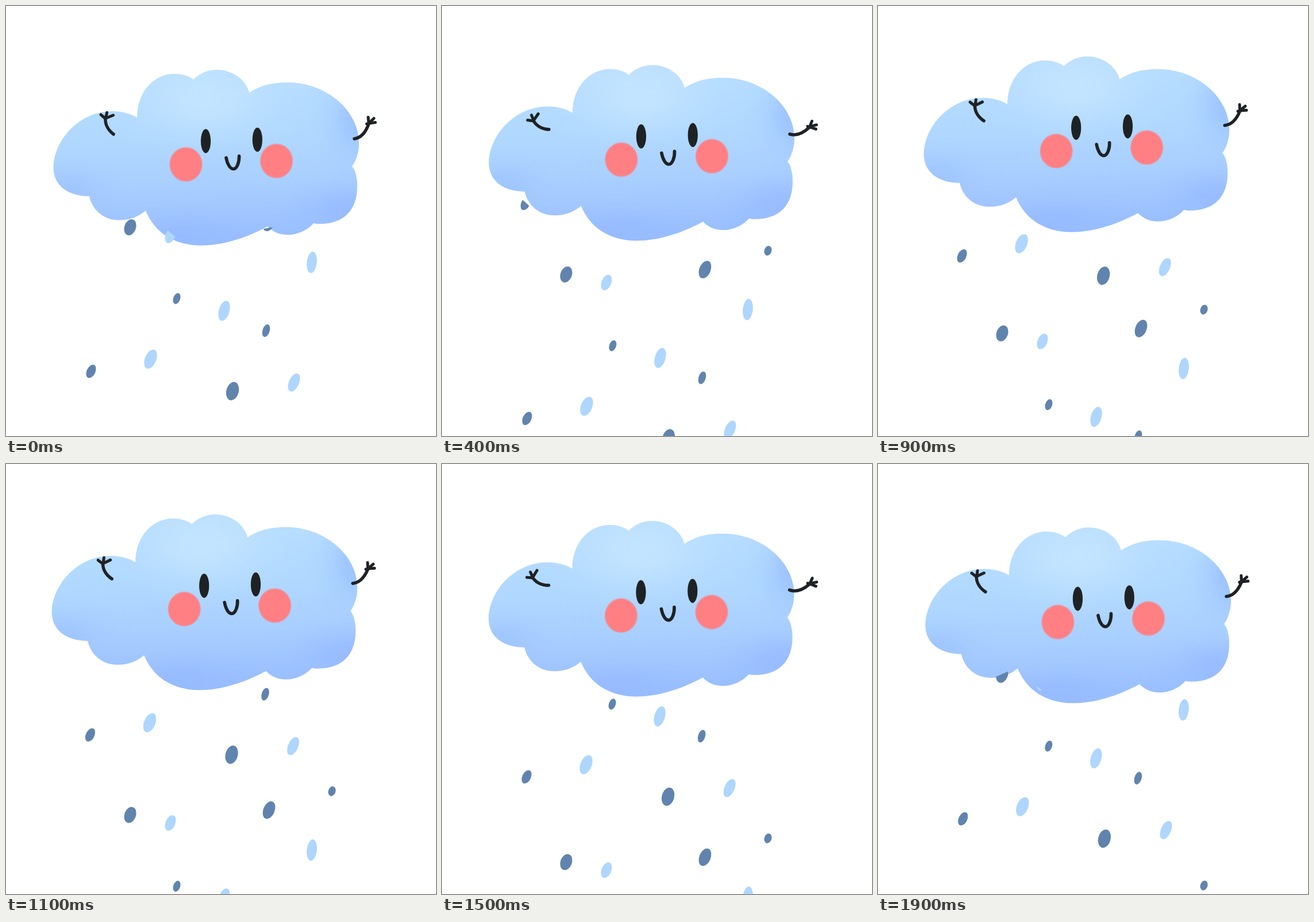
An HTML page with a canvas that plays this animation: 748 by 748 pixels, repeating every 2 s.

```html
<!DOCTYPE html>
<html lang="en">
<head>
<meta charset="utf-8">
<title>Happy rain cloud</title>
<style>
  html, body { margin: 0; width: 100%; height: 100%; overflow: hidden; background: #fff; }
  canvas { display: block; width: 100%; height: 100%; }
</style>
</head>
<body>
<canvas id="stage" width="748" height="748"></canvas>
<script>
const SIZE = 748, STEP = 100, STEPS = 20;
const ctx = document.getElementById('stage').getContext('2d');
const INK = '#1f2224', DARK = '#6084ae', LIGHT = '#aed6ff', BLUSH = '#ff7f83';

const cloud = new Path2D(`M145 331 C108 331 82 312 82.5 280 C84 232 128 183 185 183
  C202 183 216 187 228 194 C228 150 257 118 293 118 C305 118 317 121 326 128
  C336 118 350 111 367 111 C394 111 418 129 423 151 C440 139 462 133 489 133
  C560 133 614 184 614 238 C614 254 609 270 602 279 C608 285 611 300 611 313
  C611 355 588 379 545 379 C541 379 538 378.5 535 378 C524 390 508 398 490 398
  C475 398 463 392 455 383.5 C415 405 375 416.5 340 416.5 C292 416.5 258 393 243 356
  C230 367 214 372.5 197 372.5 C170 372.5 150 355 145 331 Z`);

// Rain shows only below this edge.
const rainArea = new Path2D(`M0 748 V300 L130 328 L170 364 L205 370 L226 361 L243 351 L261 346
  L268 372 L276 386 L286 394 L296 402 L330 408 L368 405 L388 401 L447 388 L461 385
  L485 391 L535 378 L590 372 L625 345 L748 345 V748 Z`);

const smile = new Path2D('M383 264 C385 275 390 283.5 395.5 283.5 C402 283.5 406 271 405.5 261');

const arms = [
  { pivot: [187, 223], swing: -18.5,
    bone: 'M187 223 C179 217 172 207 173 195',
    fingers: 'M173 196 L165 189 M173.5 195 L175.5 185.5 M174 195 L186.5 190' },
  { pivot: [606, 231], swing: 15,
    bone: 'M606 231 C619 229 626 219 631 205',
    fingers: 'M631 204 L630 193.5 M631 204 L640 195.5 M632 204 L642.5 202.5 M631 205 L627.5 205' }
].map(a => ({ ...a, bone: new Path2D(a.bone), fingers: new Path2D(a.fingers) }));

// x, y, half width, half height, tilt in degrees
const darkDrops = [
  [148, 635.5, 7.5, 12.3, 25], [394, 670, 10.7, 16.2, 15], [297, 509, 6, 9.8, 20],
  [452.5, 564.7, 6.2, 11.3, 17], [216, 385, 10, 14.3, 20], [457.5, 376.5, 9.8, 16, 22],
  [567, 343.7, 6.3, 8.6, 18]
];
const lightDrops = [
  [251.5, 614.3, 9.8, 17.5, 22], [501, 655, 8.8, 16.8, 24], [379.5, 530.3, 9.2, 18, 16],
  [532, 446, 8.7, 18.7, 6], [286, 399, 8.5, 14.2, 22]
];

const rad = deg => deg * Math.PI / 180;
const wave = turns => 1 - Math.cos(turns * 2 * Math.PI);

function ellipse(x, y, rx, ry, tilt = 0) {
  ctx.beginPath();
  ctx.ellipse(x, y, rx, ry, rad(tilt), 0, 2 * Math.PI);
  ctx.fill();
}

function glow(x, y, rx, ry, rgb, alpha) {
  ctx.save();
  ctx.translate(x, y);
  ctx.scale(rx, ry);
  const g = ctx.createRadialGradient(0, 0, 0, 0, 0, 1);
  [1, 0.8, 0.36, 0.1, 0].forEach((k, i) => g.addColorStop(i / 4, `rgba(${rgb},${alpha * k})`));
  ctx.fillStyle = g;
  ctx.fillRect(-1, -1, 2, 2);
  ctx.restore();
}

function drawCloud() {
  const g = ctx.createLinearGradient(350, 110, 358, 415);
  g.addColorStop(0, '#b8deff');
  g.addColorStop(0.4, '#b0d8ff');
  g.addColorStop(0.65, '#a9cfff');
  g.addColorStop(0.92, '#9bc0ff');
  g.addColorStop(1, '#98bdff');
  ctx.save();
  ctx.clip(cloud);
  ctx.fillStyle = g;
  ctx.fillRect(70, 100, 560, 330);
  glow(345, 165, 190, 110, '198,230,255', 0.85);
  glow(620, 195, 100, 120, '150,188,255', 0.8);
  glow(595, 355, 130, 75, '150,186,255', 0.8);
  glow(310, 402, 130, 60, '150,186,255', 0.8);
  glow(105, 320, 110, 65, '155,193,255', 0.65);
  ctx.restore();
}

function drawFace() {
  ctx.fillStyle = BLUSH;
  for (const [x, y] of [[313, 275.5], [470.5, 269.5]]) {
    ctx.globalAlpha = 0.6;
    ellipse(x, y, 28.8, 30.3);
    ctx.globalAlpha = 1;
    ellipse(x, y, 27.3, 28.6);
  }
  ctx.fillStyle = INK;
  ellipse(347.5, 235, 8.6, 21);
  ellipse(437.3, 232.6, 8.6, 21);
  ctx.lineWidth = 5.6;
  ctx.stroke(smile);
}

function drawArm({ pivot: [x, y], swing, bone, fingers }, n) {
  ctx.save();
  ctx.translate(x, y);
  ctx.rotate(rad(swing * wave(n / 10)));
  ctx.translate(-x, -y);
  ctx.lineWidth = 5.5;
  ctx.stroke(bone);
  ctx.lineWidth = 5;
  ctx.stroke(fingers);
  ctx.restore();
}

function drawRain(dx, dy) {
  for (const [color, drops] of [[DARK, darkDrops], [LIGHT, lightDrops]]) {
    ctx.fillStyle = color;
    for (const [x, y, rx, ry, tilt] of drops) ellipse(x + dx, y + dy, rx, ry, tilt);
  }
}

function draw(n) {
  ctx.fillStyle = '#fff';
  ctx.fillRect(0, 0, SIZE, SIZE);
  ctx.lineCap = ctx.lineJoin = 'round';
  ctx.strokeStyle = INK;

  const lift = wave(n / STEPS);
  ctx.save();
  ctx.translate(-1.45 * lift, -11.9 * lift);
  drawCloud();
  drawFace();
  arms.forEach(a => drawArm(a, n));
  ctx.restore();

  // One shower leaves while the next drifts in to take its place.
  const left = STEPS - n;
  ctx.save();
  ctx.clip(rainArea);
  drawRain(0, 20.5 * n);
  drawRain(-0.17 * left, -18.25 * left);
  ctx.restore();
}

const start = performance.now();
function tick() {
  draw(Math.floor((performance.now() - start) / STEP) % STEPS);
  requestAnimationFrame(tick);
}
tick();
</script>
</body>
</html>
```
